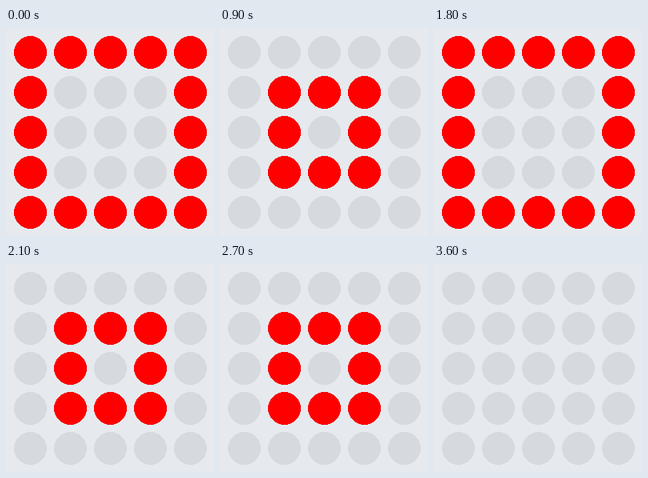
Recreate the animation shown at these times as an HTML page. Size 260 by 260 pixels, loop 4800 ms.

```html
<!DOCTYPE html>
<html lang="en">
<head>
<meta charset="utf-8">
<title>Pulsing dots</title>
<style>
  html, body { margin: 0; width: 100%; height: 100%; overflow: hidden; background: #e6eaef; }
  svg { display: block; width: 260px; height: 260px; }
</style>
</head>
<body>
<svg viewBox="0 0 260 260" shape-rendering="crispEdges"></svg>
<script>
  const OFF = '#d6dade', ON = '#ff0000';
  const STEP = 300, STEPS = 16, LIT_STEPS = 12;
  const svg = document.querySelector('svg');

  // Rings take turns: the outer one on even steps, the inner one on odd steps.
  function ringFrames(parity) {
    return Array.from({ length: STEPS + 1 }, (_, i) => ({
      offset: i / STEPS,
      fill: i < LIT_STEPS && i % 2 === parity ? ON : OFF,
      easing: 'step-end'
    }));
  }

  for (let row = 0; row < 5; row++) {
    for (let col = 0; col < 5; col++) {
      const dot = document.createElementNS(svg.namespaceURI, 'circle');
      dot.setAttribute('cx', 30.5 + col * 50);
      dot.setAttribute('cy', 30.5 + row * 50);
      dot.setAttribute('r', 20.5);
      dot.setAttribute('fill', OFF);
      svg.append(dot);

      const ring = Math.max(Math.abs(row - 2), Math.abs(col - 2));
      if (ring > 0) {
        const anim = dot.animate(ringFrames(2 - ring), { duration: STEP * STEPS, iterations: Infinity });
        anim.startTime = document.timeline.currentTime;
      }
    }
  }
</script>
</body>
</html>
```
